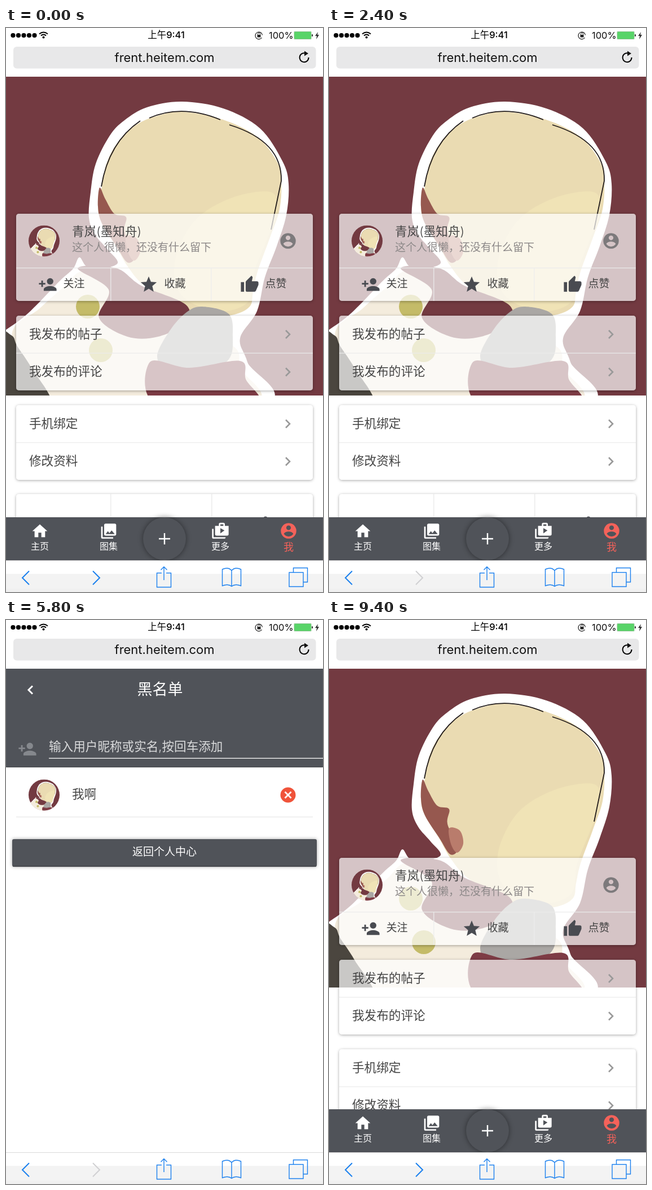
Write an HTML page with a canvas that moves like this. It is 562 px wide and 996 px high and loops after 9.6 s.

```html
<!DOCTYPE html>
<html lang="zh-CN">
<head>
<meta charset="utf-8">
<style>
html, body { margin: 0; width: 100%; height: 100%; overflow: hidden; background: #fff; }
canvas { display: block; }
</style>
</head>
<body>
<canvas id="stage" width="562" height="996"></canvas>
<script>
const ctx = document.getElementById('stage').getContext('2d');
const FONT = 'Inter, "Noto Sans CJK SC", "Noto Sans CJK", sans-serif';
const DARK = '#505359', RED = '#f4625a', BLUE = '#1b80ee', MAROON = '#733a41';
const TICK = 200, LOOP = 9600;

// Icons on a 24 unit grid, filled even-odd
const icons = {
  home: 'M10 20v-6h4v6h5v-8h3L12 3 2 12h3v8z',
  photos: 'M8 2h12a2 2 0 0 1 2 2v12a2 2 0 0 1-2 2H8a2 2 0 0 1-2-2V4a2 2 0 0 1 2-2zm3 10-3 4h12l-4-5-3 3.7zM2 6v14a2 2 0 0 0 2 2h14v-2H4V6z',
  more: 'M3 9H1v11a2 2 0 0 0 2 2h14a2 2 0 0 0 2-2H3zM18 5V3a2 2 0 0 0-2-2h-4a2 2 0 0 0-2 2v2H5v11a2 2 0 0 0 2 2h14a2 2 0 0 0 2-2V5zM12 3h4v2h-4zm0 12V8l5.5 3z',
  account: 'M12 2a10 10 0 1 0 .01 0zm0 3a3 3 0 1 1-.01 0zm0 14.2c-2.5 0-4.7-1.3-6-3.2 0-2 4-3.1 6-3.1s6 1.1 6 3.1c-1.3 1.9-3.5 3.2-6 3.2z',
  addUser: 'M15 4a4 4 0 1 0 .01 0zM6 10V7H4v3H1v2h3v3h2v-3h3v-2zm9 4c-2.7 0-8 1.3-8 4v2h16v-2c0-2.7-5.3-4-8-4z',
  star: 'M12 17.3 18.2 21l-1.7-7L22 9.2l-7.2-.6L12 2 9.2 8.6 2 9.2 7.5 14l-1.7 7z',
  thumb: 'M1 21h4V9H1zM23 10a2 2 0 0 0-2-2h-6.3l1-4.9a1.5 1.5 0 0 0-.4-1L14.2 1 7.6 7.6A2 2 0 0 0 7 9v10a2 2 0 0 0 2 2h9a2 2 0 0 0 1.8-1.2l3-7a2 2 0 0 0 .2-.8z',
  contacts: 'M4 0h16v2H4zM4 22h16v2H4zM4 4h16a2 2 0 0 1 2 2v12a2 2 0 0 1-2 2H4a2 2 0 0 1-2-2V6a2 2 0 0 1 2-2zm8 2.7a2.3 2.3 0 1 0 .01 0zM7 17h10v-1.5c0-1.7-3.3-2.5-5-2.5s-5 .8-5 2.5z',
  comment: 'M22 4a2 2 0 0 0-2-2H4a2 2 0 0 0-2 2v12a2 2 0 0 0 2 2h14l4 4zM6 12h12v2H6zM6 9h12v2H6zM6 6h12v2H6z',
  people: 'M5.5 22v-7.5H4V9a2 2 0 0 1 2-2h3a2 2 0 0 1 2 2v5.5H9.5V22zM18 22v-6h3l-2.5-7.6a2 2 0 0 0-4 0L12 16h3v6zM7.5 2a2 2 0 1 0 .01 0zM16.5 2a2 2 0 1 0 .01 0z',
  place: 'M12 2a7 7 0 0 0-7 7c0 5.2 7 13 7 13s7-7.8 7-13a7 7 0 0 0-7-7zm0 4.5a2.5 2.5 0 1 0 .01 0z',
  badge: 'M19 3h-4.2a3 3 0 0 0-5.6 0H5a2 2 0 0 0-2 2v14a2 2 0 0 0 2 2h14a2 2 0 0 0 2-2V5a2 2 0 0 0-2-2zM12 3a1 1 0 1 0 .01 0zm0 4a3 3 0 1 0 .01 0zM6 19h12v-1.4c0-2-4-3.1-6-3.1s-6 1.1-6 3.1z',
  lines: 'M7 15h10v2H7zM3 19h18v2H3zM3 11h18v2H3zM7 7h10v2H7zM3 3h18v2H3z'
};
for (const name in icons) icons[name] = new Path2D(icons[name]);

const lists = {
  black: { title: '黑名单', hint: '输入用户昵称或实名,按回车添加', icon: 'addUser' },
  filter: { title: '关键词过滤', hint: '输入屏蔽词,按回车添加', icon: 'lines' }
};

// Each step changes part of the state from its tick on
const steps = [
  [0, { page: 'profile', scroll: 92, forward: true, kb: 0, pinyin: '', value: '', row: '' }],
  [2, { page: 'edit', forward: false, sheet: 0, gender: '请选择性别' }],
  [5, { sheet: 1 }], [7, { sheet: 0, gender: '男' }],
  [10, { page: 'profile' }], [13, { scroll: 180 }], [14, { scroll: 230 }],
  [15, { page: 'black' }], [17, { kb: 1 }],
  [18, { pinyin: 'w', words: '我幢小有信易用优' }],
  [20, { pinyin: '', value: '我' }],
  [21, { pinyin: 'a', words: '啊吧不才从被次把' }],
  [22, { pinyin: '', value: '我啊' }],
  [24, { value: '', row: '我啊' }], [25, { kb: .5 }], [26, { kb: 0 }],
  [31, { page: 'profile', row: '' }],
  [33, { page: 'filter' }], [35, { kb: .5 }], [36, { kb: 1 }],
  [37, { pinyin: 'g', words: '个过给和会好还很' }],
  [38, { pinyin: 'guang', words: '广光逛咣胱犷桄潢' }],
  [39, { pinyin: 'guang gao' }],
  [40, { pinyin: '', value: '广告' }],
  [42, { value: '', row: '广告' }], [43, { kb: 0 }],
  [45, { page: 'profile', row: '', forward: true }], [46, { scroll: 110 }], [47, { scroll: 0 }]
];

function rect(x, y, w, h, color, r = 0) {
  ctx.fillStyle = color;
  ctx.beginPath();
  ctx.roundRect(x, y, w, h, r);
  ctx.fill();
}
function disc(x, y, r, color) {
  ctx.fillStyle = color;
  ctx.beginPath();
  ctx.arc(x, y, r, 0, 7);
  ctx.fill();
}
function stroke(path, color, width = 2) {
  ctx.strokeStyle = color;
  ctx.lineWidth = width;
  ctx.stroke(new Path2D(path));
}
// Text centred on y; Chinese glyphs sit lower in the em box than Latin ones
function text(str, x, y, size, color, align = 'left', weight = 300) {
  ctx.font = `${weight} ${size}px ${FONT}`;
  ctx.textAlign = align;
  ctx.fillStyle = color;
  ctx.fillText(str, x, y + size * (/[一-龥]/.test(str) ? .33 : .36));
}
function icon(name, x, y, size, color) {
  ctx.save();
  ctx.translate(x - size / 2, y - size / 2);
  ctx.scale(size / 24, size / 24);
  ctx.fillStyle = color;
  ctx.fill(icons[name], 'evenodd');
  ctx.restore();
}
const chevron = (x, y, color = '#999') => stroke(`M${x - 4} ${y - 7}l7 7-7 7`, color, 2.6);

// Smooth closed curve through x, y pairs
function blob(color, ...p) {
  const n = p.length / 2;
  const at = i => [p[(i + n) % n * 2], p[(i + n) % n * 2 + 1]];
  const handle = (i, k) => at(i).map((v, axis) => v + k * (at(i + 1)[axis] - at(i - 1)[axis]) / 6);
  ctx.fillStyle = color;
  ctx.beginPath();
  ctx.moveTo(...at(0));
  for (let i = 0; i < n; i++) ctx.bezierCurveTo(...handle(i, 1), ...handle(i + 1, -1), ...at(i + 1));
  ctx.fill();
}

// Portrait as flat shapes, laid out for the stage and reused for the avatar
function portrait(x, y, scale, round) {
  ctx.save();
  ctx.translate(x, y);
  ctx.scale(scale, scale);
  ctx.translate(0, -86);
  ctx.beginPath();
  ctx.roundRect(0, 86, 562, 563, round ? 281 : 0);
  ctx.clip();
  rect(0, 86, 562, 563, MAROON);
  blob('#fff', -20, 545, 0, 533, 40, 503, 95, 447, 119, 425, 130, 405, 143, 421, 168, 425, 198, 415,
    180, 391, 158, 365, 147, 335, 150, 290, 159, 240, 184, 190, 210, 163, 250, 140, 312, 130, 385, 142,
    450, 177, 490, 235, 501, 275, 497, 330, 480, 385, 459, 440, 445, 500, 415, 548, 428, 590, 447, 665, -20, 665);
  blob('#f4ecdd', 10, 545, 60, 495, 105, 455, 135, 430, 185, 450, 290, 520, 400, 560, 415, 600, 430, 665, 60, 665);
  blob('#eadbb2', 170, 280, 178, 240, 196, 205, 225, 175, 262, 157, 312, 148, 385, 162, 445, 192, 480, 235, 488, 268,
    485, 320, 468, 370, 446, 430, 438, 465, 432, 492, 400, 507, 350, 507, 300, 487, 245, 455, 215, 420, 195, 385, 170, 345, 163, 315);
  blob('#f0e3b6', 335, 340, 400, 300, 470, 290, 480, 325, 464, 370, 440, 430, 428, 485, 370, 500, 310, 470, 300, 410);
  blob('#96584f', 166, 282, 176, 302, 192, 328, 213, 334, 210, 360, 228, 402, 215, 414, 195, 384, 170, 345, 163, 315);
  blob('#b97c6c', 213, 368, 232, 372, 238, 395, 227, 411, 216, 395);
  blob(MAROON, 127, 424, 195, 424, 240, 455, 318, 488, 318, 520, 270, 545, 215, 545, 165, 512, 182, 462);
  blob('#aaa7a4', 320, 502, 348, 492, 395, 505, 402, 545, 395, 585, 350, 610, 290, 605, 268, 580, 290, 535);
  blob('#7e3c45', 255, 590, 325, 600, 415, 588, 425, 620, 442, 665, 268, 665);
  blob('#4b463f', -20, 540, 10, 543, 20, 562, 45, 600, 78, 665, -20, 665);
  disc(145, 492, 21, '#c4bb68');
  disc(168, 569, 21, '#c4bb68');
  stroke('M169 280Q182 202 238 164M254 159Q312 134 380 162M396 171Q490 200 488 270L470 356', '#211b1a', 1.8);
  ctx.restore();
}
const avatar = y => portrait(40, y - 27.5, 55 / 562, true);

function card(y, h) {
  ctx.save();
  ctx.beginPath();
  ctx.rect(0, 0, 562, 1200);
  ctx.roundRect(18, y, 526, h, 5);
  ctx.clip('evenodd');
  ctx.shadowColor = 'rgba(0,0,0,.35)';
  ctx.shadowBlur = 5;
  ctx.shadowOffsetY = 1;
  rect(18, y, 526, h, '#fff', 5);
  ctx.restore();
  rect(18, y, 526, h, 'rgba(255,255,255,.7)', 5);
}
const divide = y => rect(18, y, 526, 1.5, 'rgba(236,236,236,.8)');

function profile({ scroll }) {
  portrait(0, 86, 1);
  ctx.save();
  ctx.translate(0, -scroll);
  card(420, 154);
  avatar(468);
  text('青岚(墨知舟)', 117, 452, 21.6, '#444');
  text('这个人很懒，还没有什么留下', 117, 480, 19, '#8c8888');
  icon('account', 500, 468, 33, '#7d7a7c');
  divide(515);
  rect(185, 516, 1.5, 58, 'rgba(236,236,236,.8)');
  rect(363, 516, 1.5, 58, 'rgba(236,236,236,.8)');
  [['addUser', '关注', 74], ['star', '收藏', 253], ['thumb', '点赞', 432]].forEach(([name, label, x]) => {
    icon(name, x, 545, 34, '#494b51');
    text(label, x + 27.5, 544, 19, '#444');
  });
  [['我发布的帖子', '我发布的评论', 600], ['手机绑定', '修改资料', 758]].forEach(([a, b, y]) => {
    card(y, 132);
    divide(y + 65.5);
    [a, b].forEach((label, i) => {
      text(label, 41, y + 32.5 + i * 66.5, 21.6, '#444');
      chevron(500, y + 33 + i * 66.5);
    });
  });
  card(915, 132);
  [['addUser', '黑名单', 102], ['lines', '关键词过滤', 275], ['badge', '退出登录', 460]].forEach(([name, label, x]) => {
    icon(name, x, 970, 34, '#494b51');
    text(label, x, 1015, 19, '#444', 'center');
  });
  rect(185, 915, 1.5, 132, '#ececec');
  rect(364, 915, 1.5, 132, '#ececec');
  ctx.restore();

  rect(0, 864, 562, 76, DARK);
  ctx.save();
  ctx.shadowColor = 'rgba(0,0,0,.45)';
  ctx.shadowBlur = 10;
  disc(281, 902, 38, DARK);
  ctx.restore();
  stroke('M271 902h20M281 892v20', '#fff', 2.4);
  [['home', '主页', 60], ['photos', '图集', 182], ['more', '更多', 380]].forEach(([name, label, x]) => {
    icon(name, x, 888.5, 32, '#fff');
    text(label, x, 916, 16, '#fff', 'center');
  });
  icon('account', 501, 888, 33, RED);
  text('我', 501, 917, 18, RED, 'center');
}

function header(title, h) {
  ctx.save();
  ctx.shadowColor = 'rgba(0,0,0,.4)';
  ctx.shadowBlur = 3;
  rect(0, 86, 562, h, DARK);
  ctx.restore();
  rect(0, 85 + h, 562, 1, '#3b3e43');
  stroke('M47 116.500l-7 7 7 7', '#fff', 3);
  text(title, 273, 123, 27, '#fff', 'center');
}

function edit({ sheet, gender }) {
  header('个人资料', 76);
  const field = (name, label, y) => {
    icon(name, 38, y + 3, 32, '#72757c');
    text(label, 76, y, 21.6, '#cfcfcf');
    rect(76, y + 20, 486, 1.3, '#dedede');
  };
  const choice = (name, label, y) => {
    icon(name, 38, y, 32, '#72757c');
    text(label, 98, y, 21.6, '#333');
    chevron(519, y, '#777');
  };
  const caption = (label, y) => text(label, 22, y, 18.75, '#777');
  field('contacts', '昵称', 197);
  field('comment', '飞笺', 295);
  caption('详细资料', 363);
  choice('people', gender, 429);
  rect(0, 461, 562, 1.3, '#e6e6e6');
  choice('place', '请选择地区', 495);
  caption('实名认证(实名唯一且不可更改)', 560);
  field('badge', '真实姓名', 622);
  caption('想找什么(可在发现 - 寻找Ta中展示)', 691);
  [['室友', 118], ['交友', 380]].forEach(([label, x]) => {
    stroke(`M${x} 747a12.300 12.300 0 1 0 .01 0z`, '#777', 2.6);
    text(label, x + 38, 759, 21.6, '#333');
  });
  if (!sheet) return;
  rect(0, 86, 562, 854, `rgba(0,0,0,${.37 * sheet})`);
  const top = 940 - 152 * sheet;
  rect(0, top, 562, 152, '#fff');
  text('男', 22, top + 44, 21.6, '#444');
  text('女', 22, top + 109, 21.6, '#444');
}

function list({ page, kb, value, row }) {
  const { title, hint, icon: name } = lists[page], focused = kb > 0;
  header(title, 174);
  icon(name, 38, 228, name === 'lines' ? 33 : 34, focused ? RED : '#85888d');
  if (focused) {
    text(hint, 76, 183, 16.2, RED);
    text(value, 76, 223, 21.6, '#fff');
    rect(76 + value.length * 21.6, 206, 2, 33, '#4a6fe8');
    rect(76, 242, 486, 2.6, RED);
  } else {
    text(hint, 76, 224, 21.6, '#dadbdc');
    rect(76, 243.5, 486, 1.5, '#e4e4e5');
  }
  if (row) {
    if (page === 'black') avatar(309);
    text(row, page === 'black' ? 117 : 41, 308, 21.6, '#444');
    disc(500, 309, 13.5, '#f0533a');
    stroke('M494.500 303.500l11 11m0-11l-11 11', '#fff', 2.8);
    rect(18, 347, 526, 1.5, '#ececec');
  }
  const y = row ? 387 : 309;
  ctx.save();
  ctx.shadowColor = 'rgba(0,0,0,.35)';
  ctx.shadowBlur = 6;
  rect(11, y, 540, 48.5, DARK, 3);
  ctx.restore();
  rect(12, y + 47.5, 538, 1, '#2e3034');
  text('返回个人中心', 281, y + 23, 19, '#fff', 'center');
}

function keyboard({ kb, pinyin, words }) {
  const GREY = '#c2c4ca';
  const key = (x, y, w, h, color = '#fff') => {
    rect(x, y + 1.5, w, h, '#94979c', 5);
    rect(x, y, w, h, color, 5);
  };
  const label = (str, x, y, size = 24.5, color = '#111') => text(str, x, y, size, color, 'center');
  ctx.save();
  ctx.translate(0, 453 * (1 - kb));
  rect(0, 543, 562, 61, '#f0f1f3');
  rect(0, 543, 562, 1, '#cfd0d2');
  stroke('M27 580l14-14 14 14M77 566l14 14 14-14', '#c5c7ca', 2);
  text('完成', 493, 574, 20.4, BLUE, 'left', 500);
  rect(0, 604, 562, 88, '#fff');
  rect(0, 638, 562, 1, '#e3e3e5');
  if (pinyin) {
    text(pinyin, 8, 621, 16, '#111', 'left', 400);
    [...words].forEach((word, i) => label(word, i ? 44.5 + i * 62.5 : 31, 666, 27, i ? '#222' : '#f97430'));
  }
  rect(501.5, 639, 1.5, 53, '#d3d4d6');
  stroke('M522 661l9.500 8.500 9.500-8.500', '#444', 1.6);
  rect(0, 692, 562, 304, '#d7d9de');
  rect(0, 692, 562, 1, '#c9cbd0');

  key(6, 702, 84, 223, GREY);
  [...(pinyin ? 'wxyz' : '，。？！')].forEach((c, i) => {
    label(c, 46, 733 + i * 57.5, 21);
    if (i) rect(12, 702 + i * 57.7, 72, 1, '#b4b6bc');
  });
  '@/. ABC DEF GHI JKL MNO PQRS TUV WXYZ'.split(' ').forEach((letters, i) => {
    const x = 99 + i % 3 * 125, y = 702 + Math.floor(i / 3) * 77;
    key(x, y, 116, 69);
    label(i + 1, x + 58, y + 12, 14.5, '#999');
    label(letters, x + 58, y + 35);
  });
  [702, 779, 856].forEach(y => key(474, y, 82, 69, GREY));
  stroke('M498 737l9-10.500h21q3 0 3 3v15q0 3-3 3h-21zM512 732l10 10m0-10l-10 10', '#111', 1.7);
  label('重输', 515, 814, 25);
  label('0', 514, 890);

  [6, 80, 152, 377].forEach(x => key(x, 934, 63, 61, GREY));
  label('符', 37, 964, 25);
  stroke('M111 952a13 13 0 1 0 .01 0zc-9 7-9 19 0 26c9-7 9-19 0-26v26M98 965h26M101 958h20M101 972h20', '#111', 1.5);
  label('123', 183, 964, 24);
  key(224, 934, 144, 61);
  rect(292, 950, 8, 14, '#bbb', 4);
  stroke('M289 959q0 8 7 8t7-8M296 967v5', '#bbb', 1.3);
  stroke('M276 972v6h39v-6', '#222', 1.8);
  label('中', 399, 965, 21);
  label('/', 412, 972, 15);
  label('英', 421, 975, 13, '#666');
  key(449, 934, 107, 61, '#f97733');
  label('确定', 502, 964, 25, '#fff');
  ctx.restore();
}

function browser({ forward }) {
  rect(0, 0, 562, 86, '#fff');
  for (let i = 0; i < 5; i++) disc(12.5 + i * 9.5, 13, 4.1, '#000');
  stroke('M59 10.500q7.500-6 15 0M62 13.500q4.500-4 9 0', '#000', 2);
  disc(66.5, 16.5, 2, '#000');
  text('上午9:41', 284, 13, 16.5, '#000', 'center', 500);
  stroke('M453.500 17a6.300 6.300 0 1 1 1-4.500', '#222', 1.3);
  rect(445.5, 12, 6, 4.5, '#222');
  stroke('M446.500 12v-1.500a2 2 0 0 1 4 0v1.500', '#222', 1);
  text('100%', 466, 13, 16.5, '#111', 'left', 400);
  rect(511, 6.5, 30, 13, '#58d468', 2);
  stroke('M511 6.500h30v13h-30z', '#79b97f', .8);
  rect(542, 11, 2, 4, '#333', 1);
  ctx.fill(new Path2D('M553 7l-5 7h3l-1 6 5-8h-3z'));
  rect(13, 33, 536.5, 38.5, '#e8e8e9', 6);
  text('frent.heitem.com', 281, 52, 22, '#111', 'center', 400);
  stroke('M532 45a8 8 0 1 0 4.500 7', '#000', 2);
  ctx.fill(new Path2D('M529 40.500l7 4.500-7 4.500z'));

  rect(0, 940, 562, 56, '#fff');
  rect(0, 964, 562, 26, '#f3f3f3');
  rect(0, 990, 562, 6, '#f0f0f0');
  rect(0, 940, 562, 1, '#dadada');
  stroke('M41 959l-12 12 12 12', BLUE, 2);
  stroke('M154 959l12 12-12 12', forward ? BLUE : '#d0d0d2', 2);
  stroke('M276 962.500h-8.500v25h25v-25h-8.500M280 975v-23M274.500 957l5.500-5.500 5.500 5.500', BLUE, 1.4);
  stroke('M400 958q-6-7-16.500-2v29q10.500-4 16.500 1q6-5 16.500-1v-29q-10.500-5-16.500 2v28', BLUE, 1.4);
  stroke('M502 961.500h25v25h-25zM509.500 961v-7.500h25v25h-7.500', BLUE, 1.4);
}

const pages = { profile, edit, black: list, filter: list };

function frame() {
  const tick = Math.floor(performance.now() % LOOP / TICK);
  const state = Object.assign({}, ...steps.filter(([from]) => from <= tick).map(([, change]) => change));
  rect(0, 0, 562, 996, '#fff');
  pages[state.page](state);
  browser(state);
  if (state.kb) keyboard(state);
  requestAnimationFrame(frame);
}
requestAnimationFrame(frame);
</script>
</body>
</html>
```
